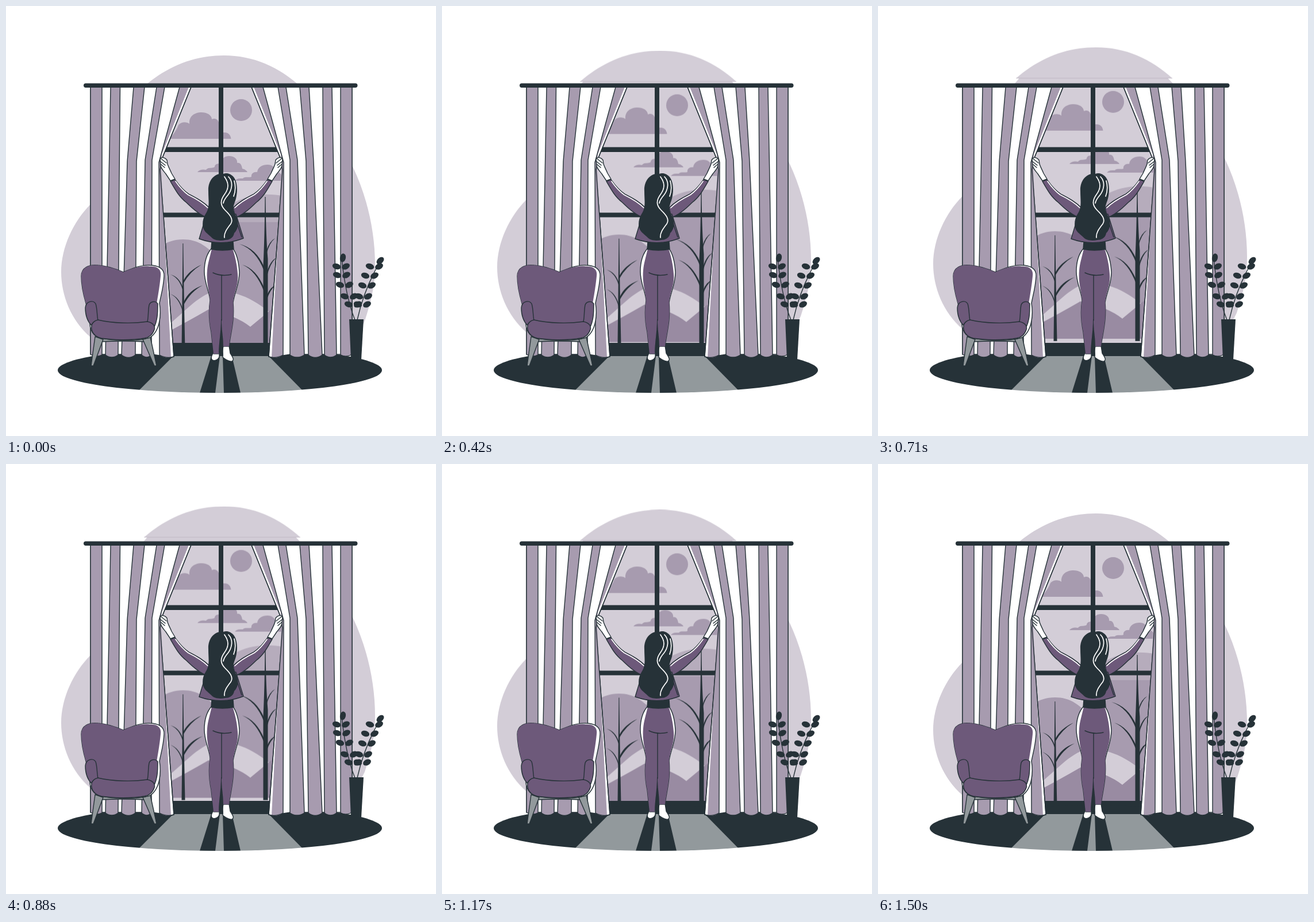
Recreate the animation shown at these times as an HTML page. Size 748 by 748 pixels, loop 1.54 s.

```html
<!DOCTYPE html>
<html lang="en">
<head>
<meta charset="utf-8">
<title>Opening the curtains</title>
<style>
  html, body { margin: 0; width: 100%; height: 100%; overflow: hidden; background: #fff; }
  svg { display: block; width: 100vw; height: 100vh; }
  .line { stroke: #263238; stroke-width: 1.4; stroke-linejoin: round; stroke-linecap: round; }
  .dark { fill: #263238; }
  .purple { fill: #6d597a; }
  .mauve { fill: #a79baf; }
  .far { fill: #b6acbc; }
  .near { fill: #998ba2; }
  .pale { fill: #d3cdd7; }
  .gray { fill: #92999c; }
  .white { fill: #fff; }
  .none { fill: none; }
  .flat { stroke: none; }
  .stem { fill: none; stroke: #263238; stroke-width: 1.4; }
  .shine { fill: none; stroke: #fff; stroke-width: 1.7; stroke-linecap: round; }
  .view { animation: bob 1540ms linear infinite; }
  @keyframes bob {
    0%, 97.4%, 100% { transform: translateY(0); }
    48.7% { transform: translateY(-15px); }
  }
</style>
</head>
<body>
<svg viewBox="0 0 748 748">
  <defs>
    <clipPath id="floor"><ellipse cx="372" cy="633.5" rx="282" ry="39.5"/></clipPath>

    <g id="drape">
      <path class="white line" d="M147 141H322L272 264L268 285L292 610Q280 614 267 608L254 606H147Z"/>
      <path class="mauve flat" d="M302 141H318L271 258L270 285L287 611Q277 614 267 607L266 272Z"/>
      <path class="none line" d="M302 141L266 272L267 607M322 141L272 264L268 285L292 610Q280 614 267 607"/>
      <path class="mauve line" d="M147 141H167V607Q157 612 147 606Z"/>
    </g>

    <g id="arm">
      <path class="white line" d="M268 265C272 262 277 264 280 268L281 275C283 281 286 286 288 291L294 301L286 304L278 292C274 287 270 283 269 278Z"/>
      <path class="none line" d="M269 265L279 273M268 270L277 277M269 275L276 281"/>
      <path class="purple line" d="M294 302C301 312 308 321 318 327C331 334 342 339 354 351L350 368C336 363 325 353 314 342C301 332 294 319 286 305Z"/>
      <path class="shine" d="M295 305C302 315 308 322 317 328.500C330 335 341 341 351 351" stroke-width="2.200"/>
    </g>

    <g id="leaves" class="dark">
      <ellipse cx="-8" cy="-2" rx="7.400" ry="5" transform="rotate(18 -8 -2)"/>
      <ellipse cx="8" cy="-2" rx="7.400" ry="5" transform="rotate(-28 8 -2)"/>
    </g>
  </defs>

  <g class="view">
    <path class="pale" d="M246 139.500L238 149C218 220 188 300 147 345C117 375 96 420 96 463C96 503 113 547 147 576Q172 602 205 611H560Q605 590 624 548C635 514 642 487 642 451C642 390 627 328 602 277C578 218 540 190 513 149L504 139.500Z"/>
    <path class="pale" d="M240 140C278 107 324 86 379 86C430 86 475 106 512 140Z"/>
    <path d="M240 139.700H512" stroke="#bbb2c0" stroke-width=".7"/>

    <g class="mauve">
      <circle cx="409" cy="181" r="19"/>
      <path d="M284 231C291 224 297 215 300 207C304 201 315 201 319 205C318 191 329 185 340 185C350 185 358 190 358 197C368 193 373 203 370 213C371 219 374 221 378 220C388 219 391 226 391.500 231Z"/>
      <path d="M333 289C337 284 343 284 348 285C351 280 358 283 363 280C363 275 369 273 374 275C374 265 381 261 388 261C397 261 403 266 402 273C407 272 410 276 411 283C416 284 419 287 420 289Z"/>
      <path d="M398 304C402 299 408 300 412 300C415 296 422 299 427 297C426 291 432 288 437 289C438 280 446 276 455 276C463 276 468 281 469 286Q481 291 484 304Z"/>
    </g>

    <path class="far" d="M372 360C400 335 435 321 485 331V593H372Z"/>
    <path class="mauve" d="M270 418C287 404 321 401 343 416C354 423 365 433 372 447V376H485V593H270Z"/>
    <path class="pale" d="M270 564C300 544 322 514 352 500C397 488 440 512 485 556V593H270Z"/>
    <path class="near" d="M270 573Q314 550 352 528Q400 538 425 558L460 529L485 518V593H270Z"/>

    <g class="dark">
      <path d="M307.400 413H308.400Q309 480 311.500 597H305.500Q307 480 307.400 413Z"/>
      <path d="M340 450Q320 462 309 482V477Q318 460 340 450ZM342 486Q322 496 309 520V515Q318 494 342 486Z"/>
      <path d="M286 467Q301 473 307 493V488Q301 471 286 467ZM286 501Q301 508 307 531V526Q301 506 286 501Z"/>
      <path d="M450.400 332H451.600Q452 400 455.500 440V597H447.500V450Q450 400 450.400 332Z"/>
      <path d="M406 414Q435 424 449 461V454Q435 421 406 414ZM411 450Q435 460 449 497V490Q435 457 411 450Z"/>
      <path d="M468 404Q458 412 453 432V426Q458 409 468 404ZM470 438Q459 448 454 470V463Q459 444 470 438ZM470 485Q460 492 454 510V503Q460 488 470 485Z"/>
    </g>
  </g>

  <g class="dark">
    <path d="M370 141H378V609H370Z"/>
    <path d="M268 245.500H480V254H268ZM268 359.500H480V367.500H268ZM268 586H480V611H268Z"/>
  </g>

  <g clip-path="url(#floor)">
    <path class="dark" d="M80 590H670V690H80Z"/>
    <path class="gray" d="M291 609H457L520 673H227Z"/>
    <path class="dark" d="M357 609H372L364 673H337ZM377 609H393L408 673H379Z"/>
  </g>

  <!-- curtains -->
  <use href="#drape"/>
  <use href="#drape" transform="matrix(-1 0 0 1 749 0)"/>
  <g class="mauve line">
    <path d="M182 141H198.500L197 300L195 607Q184 615 173 607L179 300Z"/>
    <path d="M222 141H241L227 270L225 607Q213 616 201 607L211 270Z"/>
    <path d="M262 141H276L254 268L253 607Q245 615 236 607L242 268Z"/>
    <path d="M551 141H567L570 300L575 607Q564 615 554 607L552 300Z"/>
    <path d="M511 141H527L535 270L550 607Q538 616 526 607L522 270Z"/>
    <path d="M473 141H487L507 268L519 607Q506 615 494 607V268Z"/>
  </g>
  <rect class="dark" x="135" y="134.500" width="476.500" height="7.500" rx="3.700"/>

  <!-- chair -->
  <g class="line">
    <path class="gray" d="M162 578H245L242 584Q204 582 164 584Z"/>
    <path class="gray" d="M155 575L169 580L152 626H148ZM238 580L251 576L262 626H258Z"/>
    <path class="white" d="M131 470C131 455 145 449 160 451C175 452 190 457 204 463C218 457 235 450 250 451C265 451 276 457 275 470C274 490 269 505 267 517C270 535 269 565 250 577C225 584 183 582 162 577C147 572 145 556 146 545L139 517Q131 490 131 470Z"/>
    <path class="purple flat" d="M131 470C131 455 145 449 160 451C175 452 190 457 204 463C218 457 235 451 250 453C263 452 271 458 269 470C267 490 264 506 262 518L250 556H150L139 517Q131 490 131 470Z"/>
    <path class="purple" d="M149 556C141 548 138 537 138 525C139 513 152 511 156 518C159 528 158 538 160 547C153 548 149 552 149 556Z"/>
    <path class="purple" d="M264 518C260 512 251 514 249 520C247 530 248 540 246 549L257 560C264 547 264 532 264 518Z"/>
    <path class="purple" d="M160 546C185 552 220 553 246 549C256 551 260 557 258 563C255 572 248 577 240 578C215 582 185 581 166 578C153 575 147 565 149 555C151 550 155 547 160 546Z"/>
  </g>

  <!-- vase -->
  <path class="dark" d="M597 545H622L618 615H600Z"/>
  <path class="stem" d="M607 546Q591 506 584 440M611 546Q623 492 650 446"/>
  <g class="dark">
    <ellipse cx="586" cy="438" rx="5" ry="7.500" transform="rotate(12 586 438)"/>
    <ellipse cx="651" cy="443" rx="5" ry="7.500" transform="rotate(48 651 443)"/>
  </g>
  <use href="#leaves" x="583" y="455"/>
  <use href="#leaves" x="584" y="470"/>
  <use href="#leaves" x="589" y="487"/>
  <use href="#leaves" x="597" y="507"/>
  <use href="#leaves" x="604" y="521"/>
  <use href="#leaves" x="641" y="455"/>
  <use href="#leaves" x="633" y="471"/>
  <use href="#leaves" x="628" y="488"/>
  <use href="#leaves" x="622" y="507"/>
  <use href="#leaves" x="620" y="521"/>

  <!-- woman -->
  <use href="#arm"/>
  <use href="#arm" transform="matrix(-1 0 0 1 749 0)"/>
  <g class="line">
    <path class="white" d="M361 602C358 608 355 613 359 616C363 618 370 615 371 610V602Z"/>
    <path class="white" d="M378 591C376 600 378 606 377 611C382 615 388 619 393 618C398 616 394 610 390 604L388 591Z"/>
    <path class="white" d="M358 421C349 431 345 447 345 462C345 482 354 497 355 512C352 532 353 548 357 567L361 605H370C370 585 374 568 374 545H375C375 565 378 575 378 592H388C390 572 398 548 395 516C398 497 406 484 406 463C405 446 402 431 394 421Z"/>
    <path class="purple flat" d="M358 422C355 436 351 447 350 460C348 482 354 497 355 512C352 532 353 548 357 567L361 605H370C370 585 374 568 374 545H375C375 565 378 575 378 592H388C390 572 398 548 395 516C397 497 405 484 403 466C402 450 398 433 394 422Z"/>
    <path class="none" d="M360 464Q375 471 392 467M375 468V547"/>
    <path class="dark" d="M358 410H395L396 423Q376 427 357 423Z"/>
    <path class="purple" d="M349 362L336 405Q375 419 413 404L400 362Z"/>
    <path class="none" d="M400 372L410 402"/>
  </g>
  <path class="dark" d="M378 292C362 290 351 305 352 322C352 340 355 350 347 362C341 372 340 385 347 393C352 398 354 399 357 402C362 408 372 409 382 407C390 407 396 402 397 395C406 386 405 372 398 362C392 352 398 343 400 335C404 318 402 300 392 294C388 291 382 290 378 292Z"/>
  <path class="shine" d="M380 297C388 308 388 317 380 328C372 339 373 347 381 355C390 364 396 371 391 379C384 388 379 395 380 403"/>
  <path class="shine" d="M387 297C396 306 393 320 386 329Q379 337 378 343M397 304Q401 318 396 331"/>
</svg>
</body>
</html>
```
